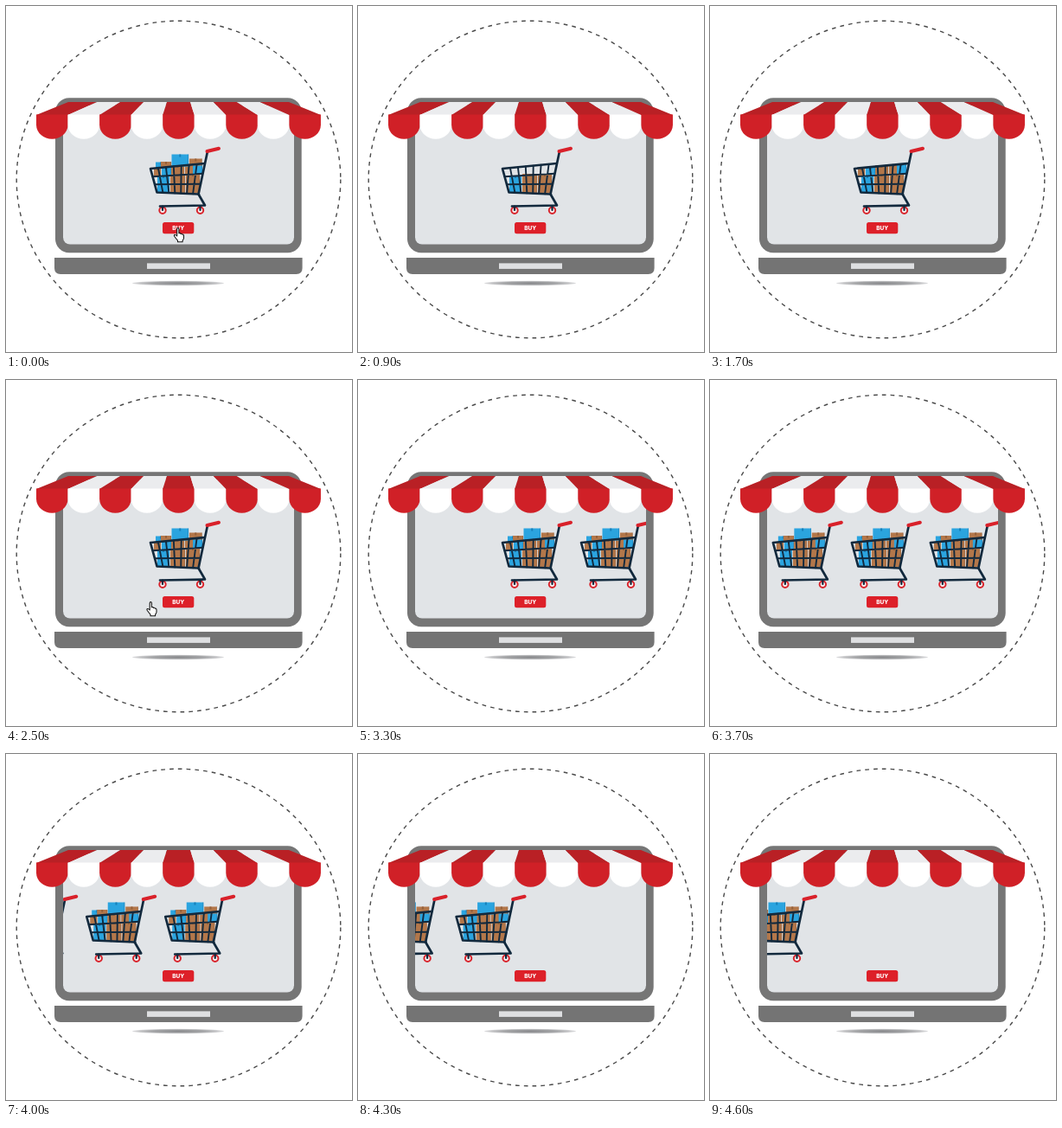
An HTML page that plays this animation: 400x400 px, repeating every 4700 ms.

```html
<!DOCTYPE html>
<html lang="en">
<head>
<meta charset="utf-8">
<title>Online shop</title>
<style>
  html, body { margin: 0; width: 100%; height: 100%; overflow: hidden; background: #fff; }
  svg { display: block; width: 100%; height: 100%; }
</style>
</head>
<body>
<svg viewBox="0 0 400 400">
  <defs>
    <clipPath id="screenClip"><rect x="66" y="115" width="267" height="161"/></clipPath>
    <radialGradient id="shade">
      <stop offset="0" stop-color="#858689"/>
      <stop offset=".6" stop-color="#a5a6a8"/>
      <stop offset="1" stop-color="#dcdcde"/>
    </radialGradient>
  </defs>

  <ellipse cx="199.5" cy="200.5" rx="187.3" ry="183.3" fill="none" stroke="#4a4a4a" stroke-width="1.4" stroke-dasharray="4.7 5.1"/>

  <rect x="57" y="106.3" width="284.7" height="179" rx="16" fill="#767676"/>
  <rect x="66" y="115" width="267" height="160.5" rx="8" fill="#e1e4e7"/>
  <path d="M56 291H342.6V303Q342.6 310 335.6 310H63Q56 310 56 303Z" fill="#747474"/>
  <rect x="163" y="297.4" width="73" height="6.5" fill="#dedfe1"/>
  <ellipse cx="199" cy="320.5" rx="53" ry="2.8" fill="url(#shade)"/>

  <g clip-path="url(#screenClip)">
    <g id="cart">
      <g id="boxes"></g>
      <g id="wheels" fill="#f6eeee" stroke="#d8232b" stroke-width="2"></g>
      <g id="frame" fill="none" stroke="#12293d" stroke-linejoin="round" stroke-linecap="round"></g>
      <path d="M232.5 168L246 164.8" stroke="#d9212a" stroke-width="4" stroke-linecap="round"/>
    </g>
    <use class="follower" href="#cart" x="91"/>
    <use class="follower" href="#cart" x="182"/>
  </g>

  <g id="awning"></g>

  <rect x="181" y="250" width="36.3" height="13.3" rx="2.5" fill="#dd2029"/>
  <text x="199.2" y="259" text-anchor="middle" font-family="Inter, 'Open Sans', sans-serif" font-size="6.5" font-weight="800" fill="#fff">BUY</text>

  <path id="cursor" d="M4.2 10V2Q4.2.6 5.3.6T6.4 2V6.8Q8 6 8.5 7.5Q10 6.9 10.4 8.2Q12 7.8 12 9.5V12.5Q11.6 14.3 10.6 15V16.8H5V15.2Q3.2 13 1.2 10.2Q.5 8.8 1.6 8.5T4.2 10Z" fill="#fff" stroke="#111" stroke-width="1.05" stroke-linejoin="round"/>
</svg>

<script>
const LOOP = 4700, TICK = 100;
const CLEAR = 100, CURSOR_IN = 2500, CURSOR_STOP = 2900, ROLL = 3300;
const SPEED = 0.2354; // px per ms
const BLUE = '#2ba4df', BROWN = '#b3774a';
const $ = id => document.getElementById(id);

function add(parent, tag, attrs) {
  const node = document.createElementNS('http://www.w3.org/2000/svg', tag);
  for (const key in attrs) node.setAttribute(key, attrs[key]);
  parent.appendChild(node);
  return node;
}

// Awning: slanted roof stripes, each ending in a rounded flap.
function buildAwning() {
  const low = i => 35 + i * 36.55;
  const high = i => i === 0 ? 72 : i === 9 ? 327 : 199.5 + (i - 4.5) * 26.9;
  for (let i = 0; i < 9; i++) {
    const red = i % 2 === 0, a = low(i), b = low(i + 1);
    add($('awning'), 'path', {
      d: `M${high(i)} 111H${high(i + 1)}L${b} 126H${a}Z`,
      fill: red ? '#b92025' : '#ebecee'
    });
    add($('awning'), 'path', {
      d: `M${a} 125.5H${b}V137.5A18.28 16.7 0 0 1 ${a} 137.5Z`,
      fill: red ? '#d02027' : '#fff'
    });
  }
}

// Basket coordinates: u runs left to right, v top to bottom.
const mix = (a, b, k) => a + (b - a) * k;
function basket(u, v) {
  const x = mix(mix(167, 229.5, u), mix(174.5, 223, u), v);
  const y = mix(mix(188, 182, u), mix(215.5, 217.5, u), v);
  return x.toFixed(1) + ' ' + y.toFixed(1);
}

function buildCart() {
  const frame = $('frame'), columns = 7;
  let grid = '';
  for (let i = 1; i < columns; i++) grid += `M${basket(i / columns, 0)}L${basket(i / columns, 1)}`;
  for (const v of [1 / 3, 2 / 3]) grid += `M${basket(0, v)}L${basket(1, v)}`;
  add(frame, 'path', { d: grid, 'stroke-width': 1.9 });
  add(frame, 'path', {
    d: `M${basket(1, 0)}L${basket(0, 0)}L${basket(0, 1)}L${basket(1, 1)}`,
    'stroke-width': 2.7
  });
  add(frame, 'path', { d: 'M233 168L222.5 217.5L230 230.5L178 231.5', 'stroke-width': 2.7 });
  for (const x of [181, 224.5]) {
    add($('wheels'), 'circle', { cx: x, cy: 236.3, r: 3.7 });
    add(frame, 'path', { d: `M${x} 231.5V236`, 'stroke-width': 2.2 });
  }
}

// Each box: time of arrival, x, y, width, height, colour.
const boxes = [
  [500, 190, 194, 17, 22, BROWN],
  [500, 208, 194, 16, 22, BROWN],
  [700, 175, 196, 14, 19, BLUE],
  [1100, 171, 187, 8, 10, BROWN],
  [1300, 180, 186, 11, 10, BLUE],
  [1500, 191, 184, 15, 11, BROWN],
  [1700, 207, 183, 10, 12, BROWN],
  [1700, 216, 182, 11, 13, BLUE],
  [1900, 173, 180.5, 12, 7, BLUE],
  [1900, 179, 180, 12, 7, BROWN],
  [2100, 212, 176.5, 14.5, 8, BROWN],
  [2300, 191.5, 171.5, 19.5, 14, BLUE]
].map(([time, x, y, width, height, fill]) => {
  const node = add($('boxes'), 'g', {});
  const dark = fill === BLUE ? '#187fb8' : '#95613a';
  add(node, 'rect', { x, y, width, height, fill });
  add(node, 'rect', { x: x + width / 2 - 1, y, width: 2, height: 3, fill: dark });
  add(node, 'path', { d: `M${x + width - .3} ${y}v${height}`, stroke: dark, 'stroke-width': .6 });
  return { time, node };
});

const show = (node, on) => node.setAttribute('visibility', on ? 'visible' : 'hidden');
const followers = document.querySelectorAll('.follower');

function render(ms) {
  const t = Math.floor((ms % LOOP) / TICK) * TICK;
  const rolling = t >= ROLL;
  for (const box of boxes) show(box.node, t < CLEAR || t >= box.time);

  const shift = rolling ? -(t - ROLL) * SPEED : 0;
  $('cart').setAttribute('transform', `translate(${shift} 0)`);
  followers.forEach(node => node.setAttribute('display', rolling ? 'inline' : 'none'));

  const k = t < CLEAR ? 1 : Math.min(1, (t - CURSOR_IN) / (CURSOR_STOP - CURSOR_IN));
  show($('cursor'), t < CLEAR || (t >= CURSOR_IN && !rolling));
  $('cursor').setAttribute('transform', `translate(${mix(162, 193.5, k)} 256)`);
}

buildAwning();
buildCart();
const start = performance.now();
function loop() {
  render(performance.now() - start);
  requestAnimationFrame(loop);
}
loop();
</script>
</body>
</html>
```
